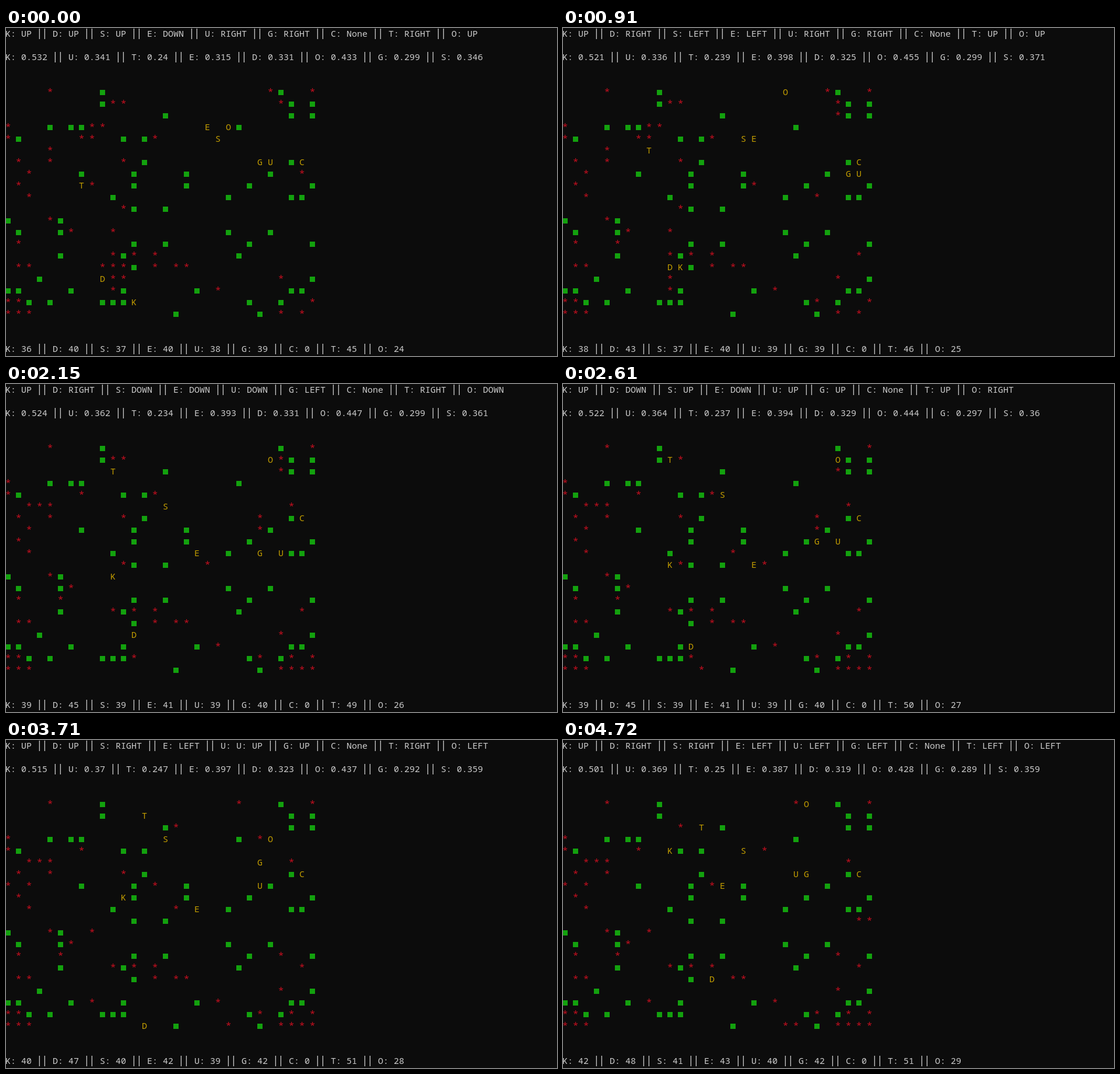
Recreate the animation shown at these times as an HTML page with a canvas. Size 945x562 px, loop 4.95 s.

```html
<!DOCTYPE html>
<html>
<head>
<meta charset="utf-8">
<style>
  html, body { margin: 0; width: 100%; height: 100%; overflow: hidden; background: #0c0c0c; }
  canvas { display: block; }
</style>
</head>
<body>
<canvas id="terminal" width="945" height="562"></canvas>
<script>
const LOOP = 4950, COLUMNS = 105, LINES = 28, BOARD_TOP = 5, BOARD_WIDTH = 30;
const CHAR_WIDTH = 9, LINE_HEIGHT = 20, LEFT = -1, BASELINE = 15;

// '#' wall, '*' food
const cells = `
....*....#...............*#..*
.........#**..............*#.#
...............#...........#.#
*...#.##**...........*#
*#.....**..#.#*
....*
.*..*......*.#.............#
..*....#....#....#.......#..*
.*......*...#....#.....#.....#
..*.......#..........#.....##
...........*#..#
#...*#
.#...#*...*..........#...#
.*..........#..#.......#.....#
.....#....*#*.*.......#
.**......***#.*.**
...#......**..............*..#
##....#...*#......#.*......##
**#.#....###...........#..#..*
***.............#.......#.*.*
`.trim().split('\n').map(row => [...row.padEnd(BOARD_WIDTH, '.')]);

const agent = (name, row, col, score, moves) => ({ name, row, col, score, moves });
const agents = [
  agent('K', 18, 12, 36, 'UULUUUULUURUUUUULU'),
  agent('D', 16, 9, 40, 'ULRRDDURRDDDRUUUUR'),
  agent('S', 5, 20, 37, 'ULLLULLDDULURRUDDR'),
  agent('E', 2, 19, 40, 'DDDLDDDDDDRULLLUUL'),
  agent('U', 6, 25, 38, 'RDRRDLLLDULLUUUDLL'),
  agent('G', 6, 24, 39, 'RRDRDLDLLUUUUUUDDL'),
  agent('C', 6, 28, 0, ''),
  agent('T', 8, 7, 45, 'RUUUUURURURRRRRLDL'),
  agent('O', 4, 21, 24, 'UUUURRRRDRDDLLUUUL'),
];
const directions = {
  U: ['UP', -1, 0], D: ['DOWN', 1, 0], L: ['LEFT', 0, -1], R: ['RIGHT', 0, 1],
};

// Food appearing after each round, as row:column
const newFood = [
  '15:8 8:18 14:28', '18:24', '2:26', '9:24 13:5', '3:15 7:24 18:27', '5:2 10:19',
  '19:27 19:29', '5:15 18:12 6:24', '5:3 5:27', '9:16 19:13',
  '0:22 2:16 7:0 7:14 11:8 13:26 17:8', '3:24', '19:21', '19:22',
  '6:22 4:19 4:10', '', '', '2:11 10:28 10:29',
];

const ratioRounds = [0, 3, 6, 8, 11, 12, 17];
const ratios = {
  K: [.532, .521, .529, .524, .517, .515, .501],
  U: [.341, .336, .362, .362, .367, .37, .369],
  T: [.24, .239, .235, .234, .242, .247, .25],
  E: [.315, .398, .398, .393, .397, .397, .387],
  D: [.331, .325, .33, .331, .325, .323, .319],
  O: [.433, .455, .453, .447, .439, .437, .428],
  G: [.299, .299, .303, .299, .293, .292, .289],
  S: [.346, .371, .366, .361, .359, .359, .359],
};

const FULL = LINES * COLUMNS;
const upToLine = line => line * COLUMNS;
// [time, round, characters of that round already printed]
const redraws = [
  [0, 0, upToLine(11)], [70, 0, FULL], [280, 1, FULL],
  [530, 2, upToLine(11)], [600, 2, FULL], [830, 3, upToLine(11)], [910, 3, FULL],
  [1140, 4, FULL], [1370, 5, FULL], [1620, 6, upToLine(11)], [1690, 6, FULL],
  [1920, 7, FULL], [2150, 8, FULL],
  [2380, 9, upToLine(5)], [2460, 9, upToLine(12)], [2530, 9, upToLine(18)], [2610, 9, FULL],
  [2780, 10, upToLine(11)], [2850, 10, FULL],
  [3080, 11, upToLine(13)], [3160, 11, upToLine(19)], [3240, 11, FULL],
  [3470, 12, upToLine(11)], [3540, 12, FULL], [3710, 13, 44], [3790, 13, FULL],
  [3940, 14, upToLine(11)], [4010, 14, FULL], [4180, 15, upToLine(11)], [4260, 15, FULL],
  [4490, 16, FULL], [4720, 17, FULL],
];

function ratioAt(values, round) {
  let i = 0;
  while (i < ratioRounds.length - 2 && round >= ratioRounds[i + 1]) i++;
  const part = (round - ratioRounds[i]) / (ratioRounds[i + 1] - ratioRounds[i]);
  return +(values[i] + (values[i + 1] - values[i]) * part).toFixed(3);
}

function playRound(round) {
  for (const a of agents) {
    if (!a.moves) continue;
    const [, dy, dx] = directions[a.moves[round]];
    const row = a.row + dy, col = a.col + dx;
    if (agents.some(b => b.row === row && b.col === col)) continue;
    a.row = row;
    a.col = col;
    if (cells[row][col] === '*') {
      cells[row][col] = '.';
      a.score++;
    }
  }
  for (const spot of newFood[round].split(' ').filter(Boolean)) {
    const [row, col] = spot.split(':');
    cells[row][col] = '*';
  }
}

function printScreen(round) {
  const list = pairs => pairs.map(([name, value]) => `${name}: ${value}`).join(' || ');
  const lines = Array(LINES).fill('');
  lines[0] = list(agents.map(a => [a.name, a.moves ? directions[a.moves[round]][0] : 'None']));
  lines[2] = list(Object.entries(ratios).map(([name, values]) => [name, ratioAt(values, round)]));
  cells.forEach((row, y) => {
    const shown = row.map(c => c === '.' ? ' ' : c);
    for (const a of agents) if (a.row === y) shown[a.col] = a.name;
    lines[BOARD_TOP + y] = shown.join(' ');
  });
  lines[27] = list(agents.map(a => [a.name, a.score]));
  return lines.map(line => line.padEnd(COLUMNS)).join('');
}

// screens[n] is the screen before round n
const screens = [printScreen(0)];
newFood.forEach((_, round) => {
  playRound(round);
  screens.push(printScreen(round));
});

const ctx = document.getElementById('terminal').getContext('2d', { alpha: false });
ctx.textAlign = 'center';

// Bars and asterisks are taller than the letters: [font size, baseline]
const glyphSizes = { '|': [18, BASELINE], '*': [17, BASELINE + 1] };

function drawChar(char, x, y, color) {
  ctx.fillStyle = color;
  if (char === '#') {
    ctx.fillRect(x, y + 6, 9, 9);
    return;
  }
  const [size, baseline] = glyphSizes[char] || [15, BASELINE];
  ctx.font = `${size}px "Noto Sans Mono", monospace`;
  ctx.fillText(char, x + CHAR_WIDTH / 2, y + baseline);
}

function draw(time) {
  const [, round, printed] = redraws.findLast(r => r[0] <= time);
  const screen = screens[round + 1].slice(0, printed) + screens[round].slice(printed);
  ctx.fillStyle = '#0c0c0c';
  ctx.fillRect(0, 0, 945, 562);
  [...screen].forEach((char, i) => {
    if (char === ' ') return;
    const line = Math.floor(i / COLUMNS);
    const onBoard = line >= BOARD_TOP && line < BOARD_TOP + cells.length;
    const color = { '#': '#13a10e', '*': '#c50f1f' }[char] || (onBoard ? '#c19c00' : '#cccccc');
    drawChar(char, LEFT + i % COLUMNS * CHAR_WIDTH, line * LINE_HEIGHT, color);
  });
}

function tick() {
  draw(performance.now() % LOOP);
  requestAnimationFrame(tick);
}
tick();
</script>
</body>
</html>
```
